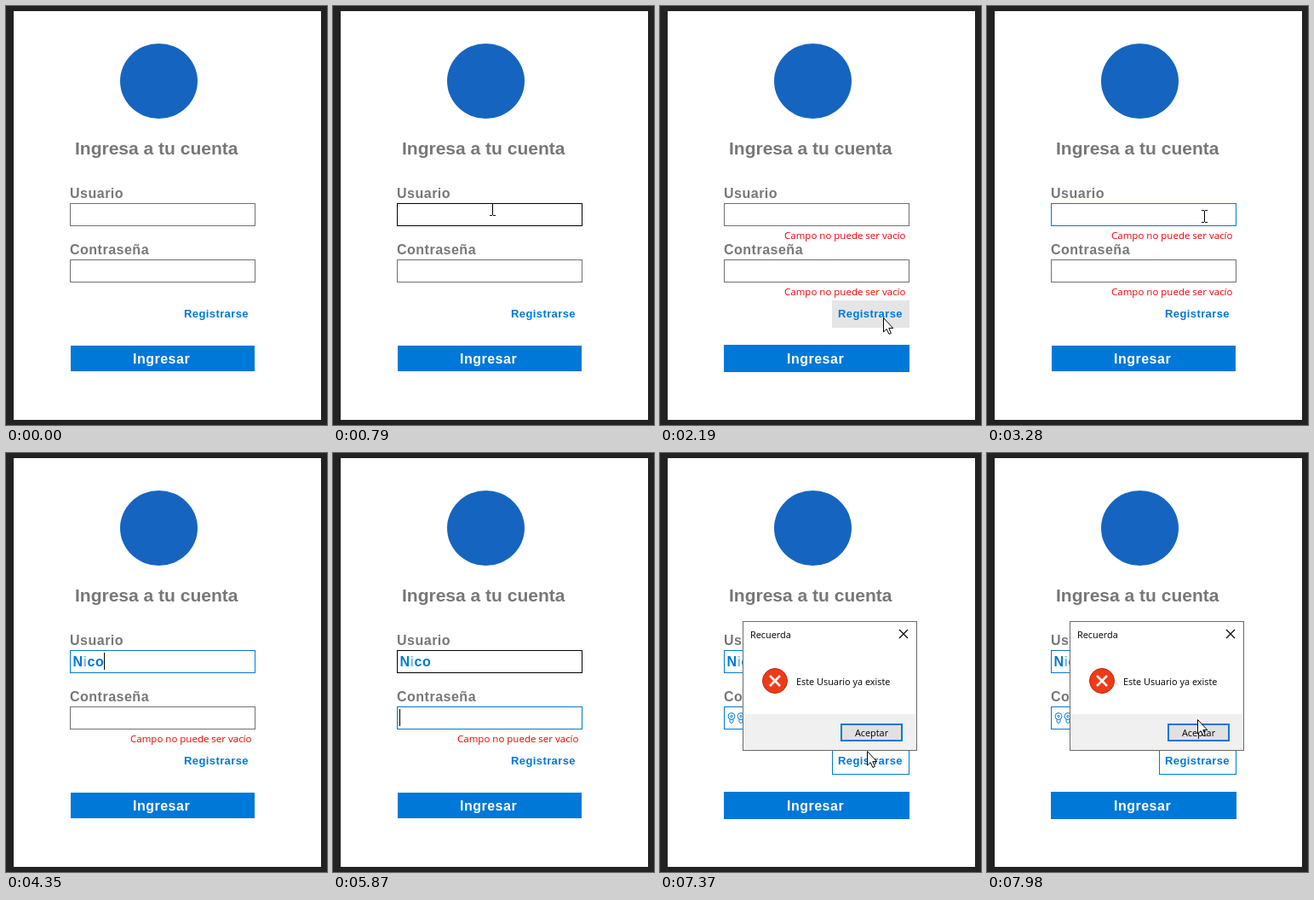
Animation of 377x491 px, one loop 8 s. Source, as an HTML page:

```html
<!DOCTYPE html>
<html lang="es">
<head>
<meta charset="utf-8">
<style>
  html, body { margin: 0; width: 100%; height: 100%; overflow: hidden; background: #222; }
  svg { display: block; width: 377px; height: 491px; }
  text { font: bold 16px "Liberation Sans", Arial, sans-serif; letter-spacing: .5px; fill: #777; }
  .title { font-size: 21px; letter-spacing: 0; }
  .link { font-size: 13px; letter-spacing: .4px; }
  .blue { fill: #0078d7; }
  .pale { fill: #79bbe9; }
  .white { fill: #fff; }
  .error { font: 11.5px "Open Sans", "Noto Sans", sans-serif; letter-spacing: 0; fill: #f00000; }
  .dialog { font: 10.9px "Open Sans", "Noto Sans", sans-serif; letter-spacing: 0; fill: #000; }
  .field { fill: #fff; }
</style>
</head>
<body>
<svg viewBox="0 0 377 491">
  <rect width="377" height="491" fill="#222"/>
  <rect x="9" y="6" width="361" height="479" fill="#fff"/>
  <ellipse cx="179.5" cy="88" rx="45.5" ry="44" fill="#1565c0"/>
  <text class="title" x="81" y="174">Ingresa a tu cuenta</text>

  <text x="75" y="225">Usuario</text>
  <rect id="userBox" class="field" x="75.5" y="231.5" width="217" height="26"/>
  <text class="blue" x="78.5" y="250"><tspan id="user1"></tspan><tspan id="user2" class="pale"></tspan><tspan id="user3"></tspan></text>
  <text id="userError" class="error" x="146" y="273">Campo no puede ser vacío</text>

  <text x="75" y="291">Contraseña</text>
  <rect id="passBox" class="field" x="75.5" y="297.5" width="217" height="26"/>
  <g id="dots" fill="none" stroke="#0078d7"></g>
  <text id="passError" class="error" x="146" y="339">Campo no puede ser vacío</text>
  <rect id="caret" width="1" height="20"/>

  <rect id="linkBox" x="202.5" y="345.5" width="90" height="31"/>
  <text class="link blue" x="209" y="365">Registrarse</text>
  <rect id="button" class="blue" x="76" y="398" width="216" height="30"/>
  <text class="white" x="149" y="419">Ingresar</text>

  <g id="dialog">
    <rect x="97.5" y="197.5" width="204" height="151" fill="#fff" stroke="#6a6a6a"/>
    <rect x="98" y="306" width="203" height="42" fill="#f0f0f0"/>
    <text class="dialog" x="106" y="217">Recuerda</text>
    <path d="M281 207l10 10m0-10l-10 10" stroke="#000" stroke-width="1.2"/>
    <circle cx="135" cy="267" r="14.5" fill="#f03a17" stroke="#b32b12"/>
    <path d="M129 261l12 12m0-12l-12 12" stroke="#fff" stroke-width="2.6"/>
    <text class="dialog" x="160" y="272">Este Usuario ya existe</text>
    <rect class="blue" x="212" y="317" width="73" height="21"/>
    <rect id="accept"/>
    <text class="dialog" x="248.5" y="332" text-anchor="middle">Aceptar</text>
  </g>

  <path id="arrow" d="M.5 .5V17L4.2 13.6L7 19.5L9.4 18.4L6.8 12.6H11.8Z" fill="#fff" stroke="#000"/>
  <path id="beam" d="M-3 -6.5H0M1 -6.5H4M-3 7.5H0M1 7.5H4M.5 -6V7" fill="none" stroke="#000"/>
</svg>
<script>
const LOOP = 8000, BLUE = "#0078d7", NAME = "Nico";
const el = id => document.getElementById(id);
const set = (id, attrs) => { for (const k in attrs) el(id).setAttribute(k, attrs[k]); };
const show = (id, on) => set(id, { visibility: on ? "visible" : "hidden" });
const between = (t, a, b) => t >= a && t < b;

// Pointer moves: first step, last step, number of steps, target x, y, easing power
const START = [312, 496];
const moves = [
  [110, 790, 11, 187, 238, 1.5],
  [860, 860, 1, 173, 225, 1],
  [990, 1390, 7, 246, 385, 3],
  [1530, 1530, 1, 246, 402, 1],
  [1790, 1790, 1, 259, 363, 1],
  [2190, 2190, 1, 262, 365, 1],
  [2260, 2460, 4, 248, 244, 1.5],
  [2930, 2930, 1, 255, 246, 1],
  [6350, 6480, 3, 324, 285, 1],
  [6550, 6760, 4, 243, 341, 1.5],
  [6830, 6970, 3, 243, 344, 1],
  [7170, 7170, 1, 243, 349, 1],
  [7770, 7980, 4, 247, 312, 1]
];
const nameTimes = [3950, 4080, 4280, 4350];
const passTimes = Array.from({ length: 7 }, (_, i) => 6070 + i * 70);
const typed = (times, t) => times.filter(s => t >= s).length;

function pointer(t) {
  let [x, y] = START;
  for (const [a, b, n, tx, ty, power] of moves) {
    if (t < a) break;
    const step = t >= b ? n : Math.floor((t - a) / (b - a) * (n - 1)) + 1;
    const p = 1 - (1 - step / n) ** power;
    x += (tx - x) * p;
    y += (ty - y) * p;
  }
  return [Math.round(x), Math.round(y)];
}

el("dots").innerHTML = passTimes.map((_, i) => {
  const x = 84 + i * 11;
  return `<g><circle cx="${x}" cy="308.5" r="3.9"/><circle cx="${x}" cy="308.5" r="1.2"/>
    <path d="M${x - 1.8} 312.2c-2 5.6 5.6 5.6 3.6 0"/></g>`;
}).join("");

function draw(t) {
  const [x, y] = pointer(t);
  const modal = t >= 7370;
  const over = (l, top, r, b) => between(x, l, r) && between(y, top, b);
  const overUser = !modal && over(75, 231, 293, 258);
  const overPass = !modal && over(75, 297, 293, 324);
  const overLink = !modal && over(202, 345, 293, 377);
  const border = (focus, hover) => focus ? BLUE : hover ? "#000" : "#707070";

  const submitted = t >= 7300;
  const userFocus = between(t, 2730, 4880);
  const passFocus = between(t, 4880, 7240);
  set("userBox", { stroke: border(userFocus || submitted, overUser) });
  set("passBox", { stroke: border(passFocus || submitted, overPass) });

  const n = typed(nameTimes, t), dots = typed(passTimes, t);
  el("user1").textContent = NAME.slice(0, Math.min(n, 1));
  el("user2").textContent = NAME.slice(1, Math.max(n, 1)).slice(0, 1);
  el("user3").textContent = NAME.slice(2, Math.max(n, 2));
  [...el("dots").children].forEach((d, i) => d.setAttribute("visibility", i < dots ? "visible" : "hidden"));
  show("userError", t >= 1660 && !n);
  show("passError", t >= 1660 && !dots);

  const caretOn = between(t, 2730, 3280) || between(t, 3810, 5410) || between(t, 5870, 6900);
  const nameWidth = n ? el("user1").parentNode.getComputedTextLength() : 0;
  show("caret", caretOn);
  set("caret", { x: Math.round(passFocus ? 78 + 11 * dots : 78 + nameWidth), y: passFocus ? 300 : 234 });

  set("linkBox", {
    fill: overLink ? "#e5e5e5" : "#fff",
    stroke: t >= 7240 ? BLUE : overLink ? "#e5e5e5" : "#fff"
  });
  const bold = between(t, 1660, 2730) || submitted;
  set("button", { stroke: bold ? BLUE : "none", "stroke-width": 2 });

  show("dialog", modal);
  const hot = over(212, 317, 285, 338), edge = hot ? 1 : 2;
  set("accept", {
    x: 212 + edge, y: 317 + edge, width: 73 - 2 * edge, height: 21 - 2 * edge,
    fill: hot ? "#e5f1fb" : "#e1e1e1"
  });

  const visible = t >= 110 && !between(t, 3950, 6350);
  const text = overUser || overPass;
  show("arrow", visible && !text);
  show("beam", visible && text);
  for (const id of ["arrow", "beam"]) set(id, { transform: `translate(${x} ${y})` });
}

function tick() {
  draw(performance.now() % LOOP);
  requestAnimationFrame(tick);
}
tick();
</script>
</body>
</html>
```
